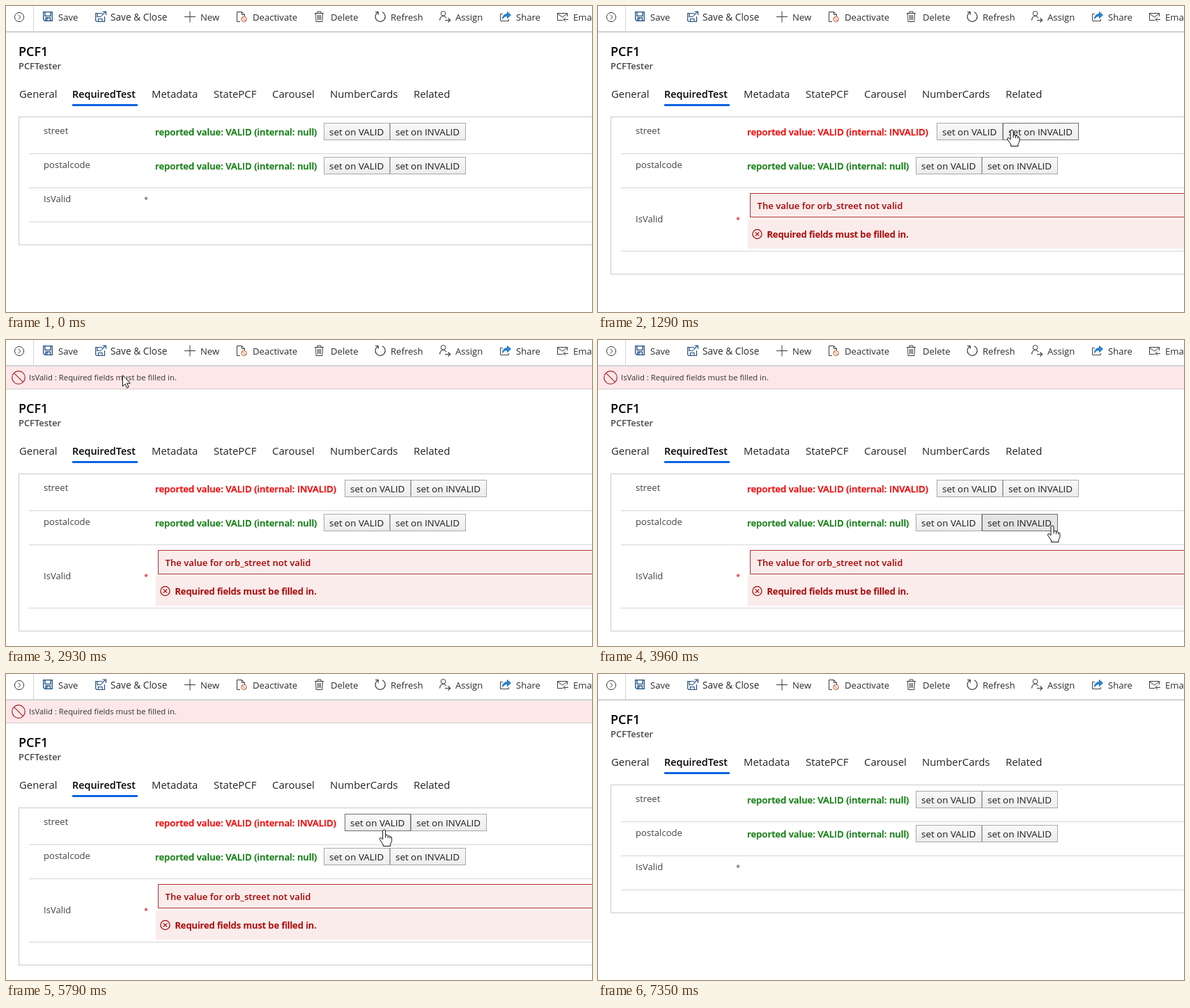
Write an HTML page that moves like this. It is 841 by 440 pixels and loops after 7.82 s.

```html
<!DOCTYPE html>
<html lang="en">
<head>
<meta charset="utf-8">
<title>Required field validation</title>
<style>
  html, body { margin: 0; width: 100%; height: 100%; overflow: hidden; background: #fff; }
  svg { display: block; width: 100vw; height: 100vh; }
  text { font-family: "Open Sans", "Noto Sans", sans-serif; fill: #333; white-space: pre; }
  .icon { fill: none; stroke: #3b3a39; stroke-width: 1; }
  .blue { stroke: #1f4e82; }
  .tool text { font-size: 13.1px; fill: #2b2b2b; }
  .tabs text { font-size: 14.9px; fill: #222; }
  .tabs .active { font-size: 14.4px; font-weight: 600; fill: #000; }
  .label { font-size: 13.1px; fill: #444; }
  .value { font-size: 13.25px; font-weight: 600; stroke-width: .3px; }
  .button text { font-size: 13.4px; fill: #1a1a1a; }
  .line { stroke: #d6d6d6; }
  .error rect { fill: #faeceb; }
  .error text { font-size: 13.1px; font-weight: 600; fill: #a80000; }
  .error .strong { stroke: #a80000; stroke-width: .3px; }
</style>
</head>
<body>
<svg viewBox="0 0 841 440">
  <defs>
    <linearGradient id="face" x2="0" y2="1">
      <stop stop-color="#f9f9f9"/><stop offset="1" stop-color="#ececec"/>
    </linearGradient>
    <linearGradient id="edge" x2="0" y2="1">
      <stop stop-color="#e4e4e4"/><stop offset=".5" stop-color="#c6c6c6"/><stop offset="1" stop-color="#eee"/>
    </linearGradient>
  </defs>

  <rect id="saveHover" x="40" width="76" height="37" fill="#d8d8d8"/>
  <g class="tool">
    <path class="icon" d="M39.5 0V37" style="stroke:#d2d2d2"/>
    <g class="icon">
      <circle cx="19" cy="16" r="6.6"/><path d="M17.5 12.7l3.3 3.3-3.3 3.3"/>
      <path class="blue" stroke-width="1.3" d="M53.7 8.7H66.3V21.3H55.7L53.7 19.3ZM56 9v5.3h8V9M57 21v-4h6.500v4M59 17.500v3"/>
      <path class="blue" stroke-width="1.2" d="M138 10.500h-9.300v10.500l1.500 1.500h11.300V15M131 11v4.500h6M132.500 22v-3.500h5.500v3.500M137 14l5.500-5.500M138.500 8h5v5"/>
      <path d="M264 7.500V23.500M256 15.500H272"/>
      <path d="M336 22.500h-4.500V8.500h7l4 4V15M338.500 8.500v4h4"/>
      <g stroke="#c8501e"><circle cx="341.500" cy="19" r="3.700"/><path d="M339 16.500l5 5"/></g>
      <path d="M443 10.500h13M447 10.500V8h5v2.500M444.500 10.500l.6 12h8.800l.6-12M447.500 13v7M449.500 13v7M451.500 13v7"/>
      <path stroke-width="1.200" d="M533.500 9.200A7.100 7.100 0 1 0 540 8.800M530 8.500h4.200v4.200"/>
      <path stroke-width="1.200" d="M622.500 20.500c.5-4 2.500-6 5-6s3.500 1 4.500 2.700"/><circle cx="627.500" cy="10.800" r="3.300"/>
      <path stroke-width="1.200" d="M630 20.500h7M634.500 17.500l3 3-3 3"/>
      <path stroke="#444" d="M713 11.500h-3.500v10h12V19"/>
      <path d="M712.500 18.500c.5-5 3.500-7 7-7V8.500l5 4.500-5 4.500v-3c-3 0-5 1.200-7 4Z" fill="#2b88d8" stroke="#1f6fb5"/>
      <path d="M799 20.500h-7.500v-10h14V15M791.500 11l7 5 7-5M800 19.500h7M803 16.500l-3 3 3 3"/>
    </g>
    <text x="75" y="21">Save</text>
    <text x="150" y="21" style="font-size:13.7px">Save &amp; Close</text>
    <text x="279" y="21">New</text>
    <text x="354" y="21">Deactivate</text>
    <text x="466" y="21">Delete</text>
    <text x="552" y="21">Refresh</text>
    <text x="645" y="21">Assign</text>
    <text x="732" y="21">Share</text>
    <text x="814" y="21">Email</text>
  </g>
  <g id="banner">
    <rect y="37" width="841" height="33" fill="#fde7e9"/>
    <path d="M0 70.500H841" stroke="#d5cbcb"/>
    <g fill="none" stroke="#a4262c" stroke-width="1.200"><circle cx="18" cy="54" r="9.300"/><path d="M11.400 47.400l13.200 13.200"/></g>
    <text x="33" y="58" font-size="11.300">IsValid : Required fields must be filled in.</text>
  </g>
  <rect y="36" width="841" height="2.500" fill="url(#edge)"/>

  <g id="page">
    <text x="18" y="72" font-size="18" font-weight="600" style="fill:#000">PCF1</text>
    <text x="18" y="91" font-size="12.900" font-weight="600" style="fill:#484644">PCFTester</text>
    <g class="tabs">
      <text x="19" y="132">General</text>
      <text x="95" y="132" class="active">RequiredTest</text>
      <text x="209" y="132">Metadata</text>
      <text x="298" y="132">StatePCF</text>
      <text x="382" y="132">Carousel</text>
      <text x="465" y="132">NumberCards</text>
      <text x="585" y="132">Related</text>
      <rect x="95" y="141" width="94" height="3" rx="1" fill="#0b62e0"/>
    </g>
    <rect id="card" x="18.500" y="159.500" width="840" fill="none" stroke="#cacaca"/>
    <path class="line" d="M33 212.500H841M33 261.500H841"/>
    <path id="rowEnd" class="line" d="M33 .5H841"/>
    <g id="rows"></g>
    <g id="validity">
      <text class="label" x="54">IsValid</text>
      <text id="star" x="198" y="-.5" font-size="11">*</text>
    </g>
    <g id="streetError" class="error">
      <rect x="218.500" y="269.500" width="640" height="34" stroke="#b03030"/>
      <text x="228.500" y="291.500">The value for orb_street not valid</text>
    </g>
    <g id="postalError" class="error">
      <rect x="218.500" y="307.500" width="640" height="34" stroke="#b03030"/>
      <text x="228.500" y="329.500">The value for orb_postalcode not valid</text>
    </g>
    <g id="required" class="error">
      <rect x="215" width="640" height="42"/>
      <g fill="none" stroke="#a80000" stroke-width="1.200"><circle cx="228.500" cy="21" r="6.600"/><path d="M225.800 18.300l5.400 5.400m0-5.400l-5.400 5.400"/></g>
      <text class="strong" x="242.500" y="26">Required fields must be filled in.</text>
    </g>
  </g>

  <g id="cursor" stroke="#111" fill="#fff" stroke-linejoin="round">
    <path id="arrow" d="M.5 .5V16.500L4.200 13 6.700 18.700 9.200 17.600 6.700 12H11.500Z"/>
    <g id="hand">
      <path d="M-2 2a2 2 0 0 1 4 0V7.500q3-.7 3.500 1.300 2.300-.6 3 1 2.500-.2 2.500 2.200V15.500q0 2.500-2 4.500V23.500H-1.500V21L-6.300 14q-.8-2.500 1.300-2.500 1 0 3 2.500Z"/>
      <path fill="none" d="M2 7.500V11.500M5.500 9V12M8.500 10V12.500"/>
    </g>
  </g>
</svg>
<script>
const LOOP = 7820;
const $ = id => document.getElementById(id);

// Cursor moves: first change, last change, number of steps, destination.
const START = [674, 239];
const MOVES = [
  [120, 580, 7, 594, 178],
  [1940, 2250, 5, 77, 10],
  [2850, 3390, 8, 652, 267],
  [4550, 4720, 3, 568, 266],
  [4880, 4950, 2, 556, 264],
  [5500, 5870, 6, 538, 210],
  [7040, 7350, 5, 820, 452]
];

function cursorAt(t) {
  let [x, y] = START;
  for (const [from, to, steps, endX, endY] of MOVES) {
    if (t < from) break;
    const step = Math.min(steps, 1 + Math.floor((t - from) * (steps - 1) / (to - from) + 1e-6));
    const p = step / steps, k = p * p * (3 - 2 * p);
    x += (endX - x) * k;
    y += (endY - y) * k;
  }
  return [x, y];
}

function button(caption, width) {
  return `<g class="button"><rect x=".5" y=".5" width="${width}" height="24"/><text x="8" y="18">${caption}</text></g>`;
}

function makeRow(name, top) {
  const group = document.createElementNS("http://www.w3.org/2000/svg", "g");
  group.setAttribute("transform", `translate(0 ${top})`);
  group.innerHTML = `<text class="label" x="54" y="16">${name}</text><text class="value" x="214" y="18"></text>`
    + button("set on VALID", 94) + button("set on INVALID", 108);
  $("rows").append(group);
  return { top, value: group.querySelector(".value"), buttons: [...group.querySelectorAll(".button")] };
}

const street = makeRow("street", 168), postal = makeRow("postalcode", 217);

const show = (id, on) => { $(id).style.display = on ? "" : "none"; };
const move = (el, x, y) => el.setAttribute("transform", `translate(${x} ${y})`);

function drawRow(row, invalid, x, y, pressed) {
  const color = invalid ? "#f00808" : "#107c10";
  row.value.textContent = `reported value: VALID (internal: ${invalid ? "INVALID" : "null"})`;
  row.value.style.fill = row.value.style.stroke = color;
  let over = false;
  row.buttons.forEach((el, i) => {
    const left = (invalid ? 486 : 456) + i * 95, width = i ? 109 : 95;
    const hover = x >= left && x < left + width && y >= row.top && y < row.top + 25;
    over = over || hover;
    move(el, left, 0);
    const rect = el.firstChild;
    rect.setAttribute("fill", hover && pressed ? "#e4e4e4" : "url(#face)");
    rect.setAttribute("stroke", hover ? "#707070" : "#a9a9a9");
  });
  return over;
}

function render(t) {
  const during = (from, to) => t >= from && t < to;
  const streetBad = during(1050, 6270), postalBad = during(4020, 5280);
  const streetError = during(1140, 6350), required = during(1290, 6510);
  const shift = during(2850, 6510) ? 33 : 0;
  const pressed = during(980, 1050) || during(3960, 4020) || during(5100, 5280) || during(6190, 6270);

  const errors = streetError + postalBad;
  const requiredTop = errors ? 269 + 38 * errors : 266;
  const rowEnd = required ? requiredTop + 45 : 310;
  const baseline = required ? Math.floor((requiredTop + 315) / 2) : errors ? 291 : 282;

  show("banner", shift);
  show("streetError", streetError);
  show("postalError", postalBad);
  show("required", required);
  move($("page"), 0, shift);
  move($("required"), 0, requiredTop);
  move($("rowEnd"), 0, rowEnd);
  move($("validity"), 0, baseline);
  $("card").setAttribute("height", rowEnd + 33 - 159);
  $("star").style.fill = required ? "#c00000" : "#5a3a30";

  const [x, y] = cursorAt(t);
  const overStreet = drawRow(street, streetBad, x, y - shift, pressed);
  const overPostal = drawRow(postal, postalBad, x, y - shift, pressed);
  const overSave = x >= 40 && x < 116 && y < 37;
  const hand = (overStreet || overPostal || overSave) && t < 6420;
  show("saveHover", overSave);
  show("cursor", during(120, 7350));
  show("hand", hand);
  show("arrow", !hand);
  move($("cursor"), x, y);
}

const begin = performance.now();
function frame() {
  render((performance.now() - begin) % LOOP);
  requestAnimationFrame(frame);
}
render(0);
requestAnimationFrame(frame);
</script>
</body>
</html>
```
